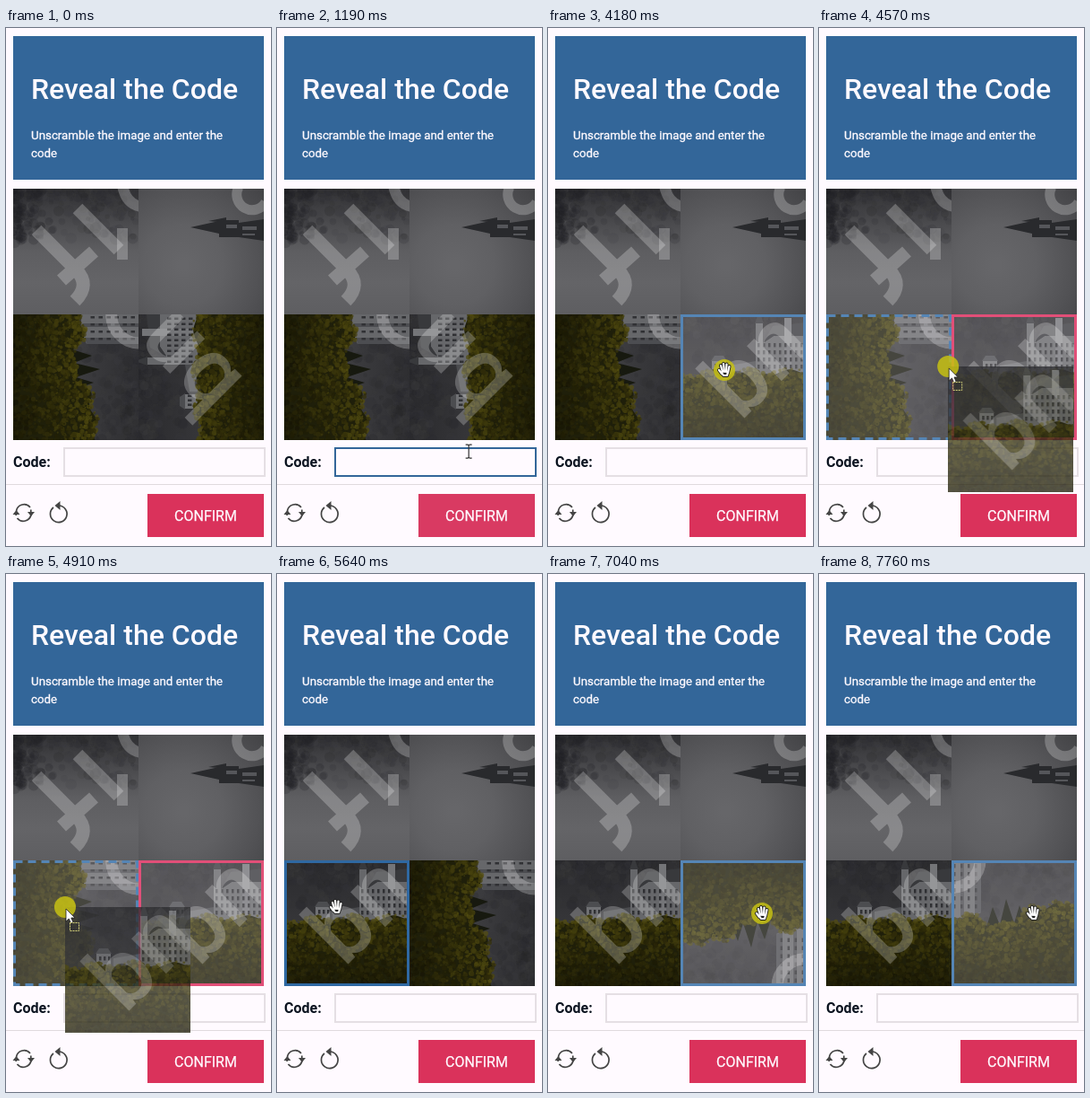
Write an HTML page with a canvas that moves like this. It is 296 px wide and 577 px high and loops after 8000 ms.

```html
<!DOCTYPE html>
<html lang="en">
<head>
<meta charset="utf-8">
<title>Reveal the Code</title>
<style>
  html, body { margin: 0; width: 100%; height: 100%; overflow: hidden; background: #fffaff; }
  body { position: relative; font-family: Roboto, sans-serif; }
  body > * { position: absolute; box-sizing: border-box; margin: 0; }
  header { left: 8px; top: 9px; width: 280px; height: 160px; background: #369; color: #fffaff; }
  h1 { position: absolute; left: 20px; top: 39px; margin: 0; font: 500 32px/40px Roboto, sans-serif; white-space: nowrap; }
  p { position: absolute; left: 20px; top: 101px; margin: 0; width: 240px; font-size: 13.33px; line-height: 20px;
      -webkit-text-stroke: .3px; }
  label { left: 8px; top: 474px; font-weight: 700; font-size: 16px; line-height: 20px; color: #0c1420; }
  #field { left: 64px; top: 467px; width: 226px; height: 33px; border: 2px solid #e5dfe4; }
  #field.hot { border-color: #369; }
  hr { left: 0; top: 508px; width: 296px; height: 1px; border: 0; background: #e0dade; }
  #ok { left: 158px; top: 519px; width: 130px; height: 48px; background: #da325b; color: #fffaff;
        font-size: 16px; line-height: 49px; text-align: center; -webkit-text-stroke: .25px; }
  #ok.hot { background: #d93a62; }
  svg { left: 0; top: 524px; fill: none; stroke: #444; stroke-width: 1.7; }
  svg .tip { fill: #444; stroke: none; }
  canvas { left: 0; top: 0; }
</style>
</head>
<body>
<header>
  <h1>Reveal the Code</h1>
  <p>Unscramble the image and enter the code</p>
</header>
<label>Code:</label>
<div id="field"></div>
<hr>
<svg width="80" height="34">
  <path d="M11.5 14a8.8 8.8 0 0 1 15.5-4M28 18a8.8 8.8 0 0 1-15.5 4M27.8 12.5V17M11.2 15.5V19"/>
  <path class="tip" d="M24 15h8l-4 5zM7.5 18h8l-4-5z"/>
  <path d="M59 8a9.3 9.3 0 1 1-6 2"/>
  <path class="tip" d="M54.500 8l6-5v10z"/>
</svg>
<div id="ok">CONFIRM</div>
<canvas width="296" height="577"></canvas>
<script>
const LOOP = 8000, SIZE = 140, LEFT = 8, TOP = 179;
const INK = 'rgba(255,255,255,.24)';
const ctx = document.querySelector('canvas').getContext('2d');
const field = document.getElementById('field'), ok = document.getElementById('ok');

let seed = 7;
const rnd = () => (seed = (seed * 16807) % 2147483647) / 2147483647;
const gray = (v, a = 1) => `rgba(${v},${v},${v + 3},${a})`;

function picture(paint) {
  const c = document.createElement('canvas');
  c.width = c.height = SIZE;
  paint(c.getContext('2d'));
  return c;
}
function sky(g, grad, ...stops) {
  stops.forEach((v, i) => grad.addColorStop(i / (stops.length - 1), gray(v)));
  g.fillStyle = grad;
  g.fillRect(0, 0, SIZE, SIZE);
}
const down = g => g.createLinearGradient(0, 0, 0, SIZE);
function dot(g, x, y, r, color) {
  g.fillStyle = color;
  g.beginPath();
  g.arc(x, y, r, 0, 7);
  g.fill();
}
function shape(g, color, path) {
  g.fillStyle = color;
  g.fill(new Path2D(path));
}
function lines(g, path, width = 15) {
  g.strokeStyle = INK;
  g.lineWidth = width;
  g.stroke(new Path2D(path));
}
function letters(g, text, x, y) {
  g.save();
  g.translate(x, y);
  g.rotate(-Math.PI / 4);
  g.font = '500 104px Roboto, sans-serif';
  g.fillStyle = INK;
  g.fillText(text, 0, 0);
  g.restore();
}
function hills(g, count, height) {
  for (let i = 0; i < count; i++) {
    const y = rnd() * rnd() * height;
    dot(g, rnd() * SIZE, y, 2 + rnd() * 5, gray(32 + rnd() * 34, .2));
  }
}
// Foliage grows darker towards the ground
function trees(g, edge) {
  for (let x = 0; x < SIZE; x++) {
    g.fillStyle = '#1f1f0a';
    g.fillRect(x, edge(x) + 3, 1, SIZE);
  }
  for (let i = 0; i < 1500; i++) {
    const x = rnd() * SIZE, top = edge(x), d = rnd();
    const v = (80 - 46 * d) * (.55 + rnd() * .55);
    dot(g, x, top + d * (SIZE - top), .8 + rnd() * 2.2, `rgba(${v},${v * .93},${v * .2},.75)`);
  }
}
function windows(g, x, y, cols, rows, dx, dy) {
  g.fillStyle = '#303134';
  for (let i = 0; i < cols * rows; i++)
    g.fillRect(x + i % cols * dx, y + Math.floor(i / cols) * dy, 2.5, 4.5);
}

const fog = picture(g => {
  sky(g, down(g), 48, 72, 94, 100, 94);
  hills(g, 200, 65);
  for (let i = 0; i < 90; i++)
    dot(g, rnd() * rnd() * 50, rnd() * 60, 2 + rnd() * 4, gray(30, .2));
  lines(g, 'M26 46L70 90Q87 107 69 125M54 102L90 70');
  lines(g, 'M72 22L118 68');
  lines(g, 'M122 79V44', 12);
  lines(g, 'M122 -4Q126 18 144 20', 12);
});
const spire = picture(g => {
  sky(g, g.createRadialGradient(50, 85, 5, 50, 85, 125), 102, 96, 82, 66);
  shape(g, '#292a2d', 'M58 43L90 36V50ZM78 36L98 32V38ZM90 35H112V54H90ZM112 38L140 34V58L112 54Z');
  shape(g, '#55565a', 'M98 40H110V44H98ZM116 42H132V46H116ZM116 50H130V52H116Z');
  lines(g, 'M112 -2A17 17 0 0 0 142 15', 11);
});
const grove = picture(g => {
  sky(g, down(g), 46, 56, 66, 60);
  hills(g, 220, 90);
  shape(g, '#66676a', 'M0 0H33V58L20 64H0Z');
  shape(g, '#4c4d51', 'M10 0H14V62H10ZM26 0H33V58L26 60Z');
  windows(g, 2, 4, 4, 6, 8, 9);
  shape(g, '#17190f', 'M36 84L46 52L54 72L61 43L70 70L76 50L90 90Z');
  trees(g, x => 61 + 18 * Math.exp(-(((x - 55) / 22) ** 2)) - x * .12 + 3 * Math.sin(x / 5));
  lines(g, 'M-2 30A31 31 0 0 0 32 -3', 13);
});
const castle = picture(g => {
  sky(g, down(g), 42, 50, 58, 52);
  hills(g, 200, 80);
  shape(g, '#4a4b4e', 'M54 57L84 52V66H54Z');
  shape(g, '#707174', 'M35 52H51V66H35Z');
  shape(g, '#4c4d50', 'M34 52L38 46H48L52 52Z');
  shape(g, '#66676a', 'M84 10H92V32L104 24H140V66H84Z');
  shape(g, '#38393c', 'M83 10L88 -4L93 10ZM92 32L103 13L140 9V24H104Z');
  shape(g, '#747578', 'M116 4H124V62H116Z');
  windows(g, 86, 32, 9, 4, 6, 8);
  windows(g, 38, 55, 3, 1, 5, 1);
  trees(g, x => 65 - x * .03 + 3 * Math.sin(x / 7));
  letters(g, 'bn', 67, 120);
});

// Pointer legs: start, end, from, to, easing
const smooth = u => u * u * (3 - 2 * u);
const legs = [
  [860, 1650, [242, 577], [195, 399], u => 1 - (1 - u) ** 1.65],
  [1720, 1980, [195, 399], [197, 381], smooth],
  [4310, 4910, [197, 381], [66, 371], smooth],
  [5640, 6030, [66, 371], [239, 378], smooth]
];
function pointer(t) {
  const [t0, t1, a, b, ease] = legs.filter(leg => t >= leg[0]).pop();
  const u = ease(Math.min(1, (t - t0) / (t1 - t0)));
  return a.map((v, i) => v + (b[i] - v) * u);
}
const presses = [[2450, 2580], [4180, 5430], [6360, 6500], [7040, 7100], [7630, 7700]];

function tile(img, x, y, turns = 0, alpha = 1) {
  ctx.save();
  ctx.globalAlpha = alpha;
  ctx.translate(x + SIZE / 2, y + SIZE / 2);
  ctx.rotate(turns * Math.PI / 2);
  ctx.drawImage(img, -SIZE / 2, -SIZE / 2);
  ctx.restore();
}
function frame(x, y, color, dash = []) {
  ctx.strokeStyle = color;
  ctx.lineWidth = 3;
  ctx.setLineDash(dash);
  ctx.strokeRect(x + 1.5, y + 1.5, SIZE - 3, SIZE - 3);
  ctx.setLineDash([]);
}
function outlined(path, inner, outer) {
  ctx.lineCap = ctx.lineJoin = 'round';
  for (const [color, width] of [['#222', outer], ['#fff', inner]]) {
    ctx.strokeStyle = color;
    ctx.lineWidth = width;
    ctx.stroke(path);
  }
}
const hand = new Path2D('M-6 0L-3 4M-4 -5L-2 2M-1 -7L0 2M2.5 -6.5L2 2M5.5 -4L4 3M-3 3L-1 6H3L4 2L-2 1Z');
const arrow = new Path2D('M0 0V14L3.3 11L5.5 16L8 15L5.8 10H10Z');
const beam = new Path2D('M-3.5 -7.5H-1L0 -6.5L1 -7.5H3.5M0 -6.5V6.5M-3.5 7.5H-1L0 6.5L1 7.5H3.5');

function cursor(x, y, kind) {
  ctx.save();
  ctx.translate(x, y);
  if (kind === 'hand') {
    outlined(hand, 2.2, 4);
  } else if (kind === 'beam') {
    ctx.strokeStyle = '#333';
    ctx.lineWidth = 1.2;
    ctx.stroke(beam);
  } else {
    ctx.translate(1, 2);
    ctx.fillStyle = '#fff';
    ctx.fill(arrow);
    ctx.strokeStyle = '#222';
    ctx.lineWidth = .8;
    ctx.stroke(arrow);
    if (kind === 'drag') {
      ctx.strokeStyle = '#d8d47a';
      ctx.lineWidth = 1;
      ctx.setLineDash([2, 1]);
      ctx.strokeRect(4.5, 15.5, 10, 9);
    }
  }
  ctx.restore();
}

function draw(t) {
  const shown = t >= 860, [x, y] = shown ? pointer(t) : [-99, -99];
  const pressed = presses.some(([a, b]) => t >= a && t < b);
  const dragging = t >= 4310 && t < 5430, swapped = t >= 5430;
  const dropped = swapped && t < 5700;
  const inTiles = shown && y < TOP + 2 * SIZE;
  const inField = y >= 467 && y < 500;
  const hover = inTiles ? (x < LEFT + SIZE ? 0 : 1) : -1;
  const groveTurns = 1 + [6500, 7100, 7700].filter(s => t >= s).length;
  const row = [[grove, groveTurns], [castle, t < 2580 ? 3 : 0]];
  if (swapped) row.reverse();

  field.className = inField ? 'hot' : '';
  ok.className = t > 900 && t < 1250 ? 'hot' : '';

  ctx.clearRect(0, 0, 296, 577);
  tile(fog, LEFT, TOP);
  tile(spire, LEFT + SIZE, TOP);
  row.forEach(([img, turns], i) => {
    const left = LEFT + i * SIZE, top = TOP + SIZE;
    const held = dragging && i === 1;
    const lit = held || (hover === i && !dropped);
    tile(img, left, top, turns, lit ? .8 : 1);
    if (held) frame(left, top, '#e14f78');
    else if (hover === i) frame(left, top, dropped ? '#2f68a2' : '#5585b5', dragging ? [9, 6] : []);
  });
  if (!shown) return;
  if (dragging) tile(castle, x, y, 0, .76);
  if (pressed) dot(ctx, x, y, 12, 'rgba(198,192,20,.86)');
  cursor(x, y, dragging ? 'drag' : inTiles ? 'hand' : inField ? 'beam' : 'arrow');
}

const start = performance.now();
function tick() {
  draw((performance.now() - start) % LOOP);
  requestAnimationFrame(tick);
}
tick();
</script>
</body>
</html>
```
